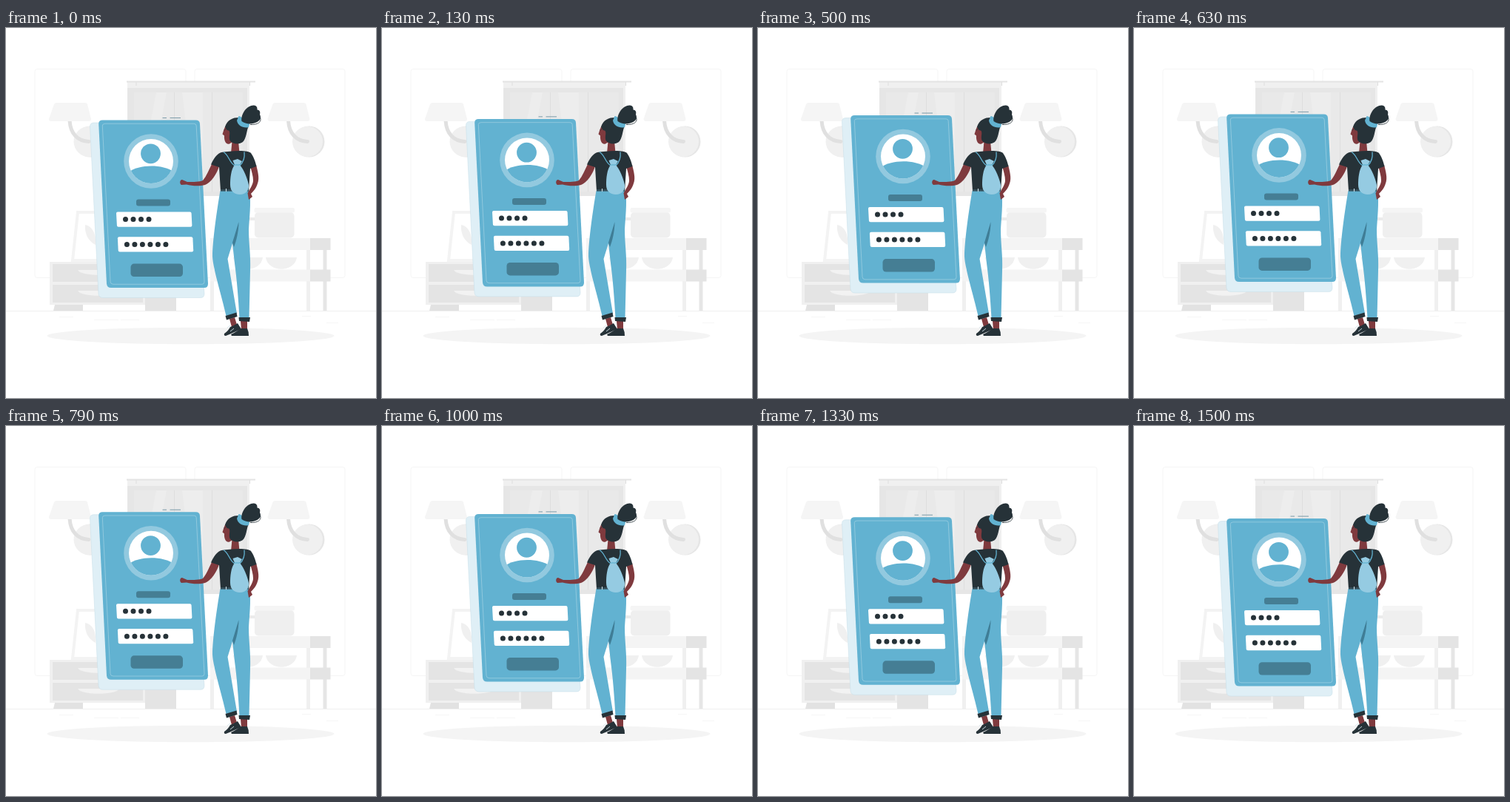
Recreate the animation shown at these times as an HTML page. Size 500 by 500 pixels, loop 1.54 s.

```html
<!DOCTYPE html>
<html lang="en">
<head>
<meta charset="utf-8">
<style>
  html, body { margin: 0; height: 100%; overflow: hidden; background: #fff; }
  svg { display: block; width: 100%; height: 100%; }
  .blue { fill: #62b2d1; }
  .dark { fill: #263238; }
  .skin { fill: #7f3a3e; }
  .teal { fill: #457e94; }
  .line { fill: none; }
</style>
</head>
<body>
<svg viewBox="0 0 500 500">
  <defs>
    <clipPath id="avatar"><circle cx="196" cy="180" r="30"/></clipPath>
    <g id="lamp">
      <circle cx="114" cy="153.5" r="21" fill="#e6e6e6"/>
      <circle cx="112" cy="153.5" r="20.5" fill="#f0f0f0"/>
      <path class="line" d="M86 125C87 143 97 153 112 153.500" stroke="#e0e0e0" stroke-width="5" stroke-linecap="round"/>
      <path d="M68 101H107Q109 101 110 103L115 123Q115 126 112 126H61Q58 126 58 123L65 103Q66 101 68 101Z" fill="#f5f5f5"/>
    </g>
  </defs>

  <g id="room">
    <g class="line" stroke="#f1f1f1" stroke-width=".7">
      <rect x="39" y="55.500" width="204" height="282" rx="3"/>
      <rect x="255" y="55.500" width="203" height="282" rx="3"/>
    </g>
    <path d="M164 73H329V227H164Z" fill="#f0f0f0"/>
    <path d="M164 81H326V227H164Z" fill="#e6e6e6"/>
    <path d="M173 87H320V221H173Z" fill="#e9e9e9"/>
    <path d="M203 87H217L205 150H191ZM238 87H266V187H250Z" fill="#ededed"/>
    <path class="line" d="M227.500 87V221M278.500 87V221M176 73V78M329.500 73V78" stroke="#dedede"/>
    <path d="M163 71.500H337V73.500H163Z" fill="#e4e4e4"/>
    <use href="#lamp"/>
    <use href="#lamp" x="295.500"/>

    <path class="line" d="M150 249H97L90 314H150" stroke="#f3f3f3" stroke-width="4"/>
    <path d="M107 266C117 268 122 278 121 293C111 288 106 278 107 266Z" fill="#f0f0f0"/>
    <path d="M59 316H188V374H59Z" fill="#f0f0f0"/>
    <path d="M63 319H185V343H63ZM63 347H185V371H63ZM188 316H230V382H188Z" fill="#e4e4e4"/>
    <path d="M97 327H153C149 336 101 336 97 327ZM97 355H153C149 364 101 364 97 355Z" fill="#f2f2f2"/>
    <path d="M66 374H104V382H64Z" fill="#e2e2e2"/>

    <path d="M276 284H281V382H276ZM406 284H411V382H406Z" fill="#f0f0f0"/>
    <path d="M428.500 284H433.500V382H428.500Z" fill="#e6e6e6"/>
    <path d="M276 284H411V300H276ZM276 326.500H411V342.500H276Z" fill="#f4f4f4"/>
    <path d="M411 284H438.500V300H411ZM411 326.500H438.500V342.500H411Z" fill="#e4e4e4"/>
    <path d="M351 310H393C390 331 354 331 351 310ZM307 310H347C344 331 310 331 307 310Z" fill="#f0f0f0"/>
    <path class="line" d="M338 258H329" stroke="#ebebeb" stroke-width="4"/>
    <rect x="336" y="249" width="53.500" height="34.500" rx="5" fill="#efefef"/>
    <rect x="335.500" y="243" width="54.500" height="6.500" rx="2" fill="#f5f5f5"/>

    <path class="line" d="M0 382.500H500" stroke="#ebebeb" stroke-width=".8"/>
    <path class="line" d="M400 389.500H412M433 398.500H449M72 390.500H91M119 394.500H152M155 394.500H180" stroke="#f3f3f3" stroke-width=".7"/>
    <ellipse cx="249.500" cy="416" rx="194" ry="11.300" fill="#f4f4f4"/>
  </g>

  <g id="card">
    <path class="line" d="M211.500 121.500H217M221.500 121.500H236" stroke="#7a9aa8"/>
    <path d="M119 128H250L268 359Q268 364.500 263 364.500H131Q125.500 364.500 125 359L113.500 133Q113.500 128 119 128Z" fill="#dfeff6" stroke="#c4dde6" stroke-width=".5"/>
    <path class="blue" d="M130.500 124.500H256.500Q261.700 124.500 262 129.500L273 345.500Q273 351 268 351H142Q136.500 351 136 345.500L125.200 129.500Q125.200 124.500 130.500 124.500Z"/>
    <path class="line" d="M134 129.300H254Q257 129.300 257.200 132L268 343Q268 346.300 265 346.300H145Q141.300 346.300 141 343L130.300 132Q130.300 129.300 134 129.300Z" stroke="#a3d1e3" stroke-width=".7"/>
    <circle cx="196" cy="180" r="36.800" fill="#92c9df"/>
    <circle cx="196" cy="180" r="30" fill="#fff"/>
    <g class="blue" clip-path="url(#avatar)">
      <circle cx="195.500" cy="169.800" r="13.400"/>
      <path d="M165 196C176 184 215 183 228 196V214H165Z"/>
    </g>
    <rect class="teal" x="176" y="231.500" width="46" height="9" rx="3"/>
    <path d="M151 248.500H248.500Q250.500 248.500 250.600 250.500L251.400 266.800Q251.400 268.800 249.400 268.800H152Q150 268.800 149.900 266.800L149 250.500Q149 248.500 151 248.500Z" fill="#fff"/>
    <path d="M153 282.300H250.300Q252.300 282.300 252.400 284.300L253.200 300.600Q253.200 302.600 251.200 302.600H153.800Q151.800 302.600 151.700 300.600L150.900 284.300Q150.900 282.300 153 282.300Z" fill="#fff"/>
    <g class="line" stroke="#263238" stroke-width="7" stroke-linecap="round" stroke-dasharray="0 10.500">
      <path d="M161.500 258.500H193.500"/>
      <path d="M163.400 292.500H216.400"/>
    </g>
    <rect class="teal" x="168.500" y="318.600" width="70.500" height="17.400" rx="4.500"/>
  </g>

  <g id="woman">
    <path class="skin" d="M302 393L309 391 312 401 305 404ZM317 396H326V408H318Z"/>
    <path class="dark" d="M303 404C306 403 309 401 313 399L318 407C312 409 303 414 297 416Q294 416 295 413C298 411 301 408 303 404Z"/>
    <path class="dark" d="M304 414C309 412 314 408 318 406H326Q328 410 328 416H305Z"/>
    <path class="line" d="M299 405L303 402M303 410L308 406" stroke="#d4e5ec" stroke-width=".9"/>
    <path class="blue" d="M289.500 220H329.500C331 238 329 256 328 272C328 292 331 308 330 328L328.500 392H315.500C314 366 312 340 309 318L306 291 299.500 312 312 386 297.500 389C291 360 280 326 279 309C279 288 285 246 289.500 220Z"/>
    <path d="M314.500 262C314.500 275 311 288 308 296L306 290Z" fill="#3f7d96"/>
    <path class="dark" d="M296.500 389L311.500 384.500 312.500 390 298 394.500ZM314.500 391H330L329 397 315 396Z"/>

    <path class="skin" d="M305.500 153H314L315.500 169H304Z"/>
    <path class="skin" d="M278 184L288 187C285 197 277 209 269 212C262 214 251 213.500 244 211.500L237 212C234 210 235 205 238 205L245 208C254 208 261 208 266 206C271 200 274 192 278 184Z"/>
    <path class="skin" d="M330 187L338 185C340 193 343 203 340 210C338 217 334 221 331 224L333 228 328 232 326.500 223C330 217 334 211 334 206C334 200 332 194 330 187Z"/>
    <path class="dark" d="M291 168C298 167 306 166 315 166C324 166 329 167 331 169C334 173 337 180 338.500 187L330 190 328 220.500H290L288 188 277 184.500C280 177 286 169 291 168Z"/>
    <path class="line" d="M290 219H328" stroke="#4f7f92" stroke-width=".7"/>
    <path class="line" d="M297.500 217V221" stroke="#d4e5ec"/>
    <path class="line" d="M294 167.500C302 173 301 181 309 186M322 167.500C323 176 320 182 316 186" stroke="#62b2d1" stroke-width="1.300"/>
    <path d="M309 185C304 191 303 203 303 212C303 220 308 225 316 225C324 225 329 219 328 212C326 202 321 191 316 185L319 180 313 177 306.500 179Z" fill="#95cbe2"/>
    <path class="line" d="M308.500 185H316.500" stroke="#62b2d1" stroke-width="1.200"/>

    <path class="skin" d="M297 132C294.500 136 294 139 292.500 143.500L295 145.500C294.500 152 297 158 302 156.500L306 154 304 137Z"/>
    <path class="dark" d="M296 133.500C299 124 307 121 314 121C315 129 320 134 327.500 133.500C325 139 325 149 320 154C315 158 306 157 302.500 152C300.500 147 304 141 301 138.500Q298 139 296 133.500Z"/>
    <path class="line" d="M294.500 138L297 137" stroke="#263238" stroke-width=".7"/>
    <path class="blue" d="M314.500 119C318 119 322 125 329.500 128L328 134C321 136 313 132 312 125Z"/>
    <path class="dark" d="M318.500 126C317 116 326 104 335 104.500Q340 105 339.500 110.500Q344.500 111 343 117Q346 122 341 126C335 130 325 131 318.500 126Z"/>
    <path class="line" d="M343.500 121C346 127 340 131 330 130.500" stroke="#263238" stroke-width=".8"/>
  </g>
</svg>
<script>
  const LOOP = 1540, STEPS = 37, LOWEST = 35.65, RISE = 10;
  const card = document.getElementById("card");

  function draw(now) {
    const step = Math.floor((now % LOOP + 5) / LOOP * STEPS) % STEPS;
    // Linear float: 0 at the lowest point, 1 at the highest
    const phase = (step - LOWEST + STEPS) % STEPS / STEPS;
    const height = 1 - Math.abs(1 - 2 * phase);
    card.setAttribute("transform", `translate(0 ${0.73 - RISE * height})`);
    requestAnimationFrame(() => draw(performance.now() - start));
  }

  const start = performance.now();
  draw(0);
</script>
</body>
</html>
```
